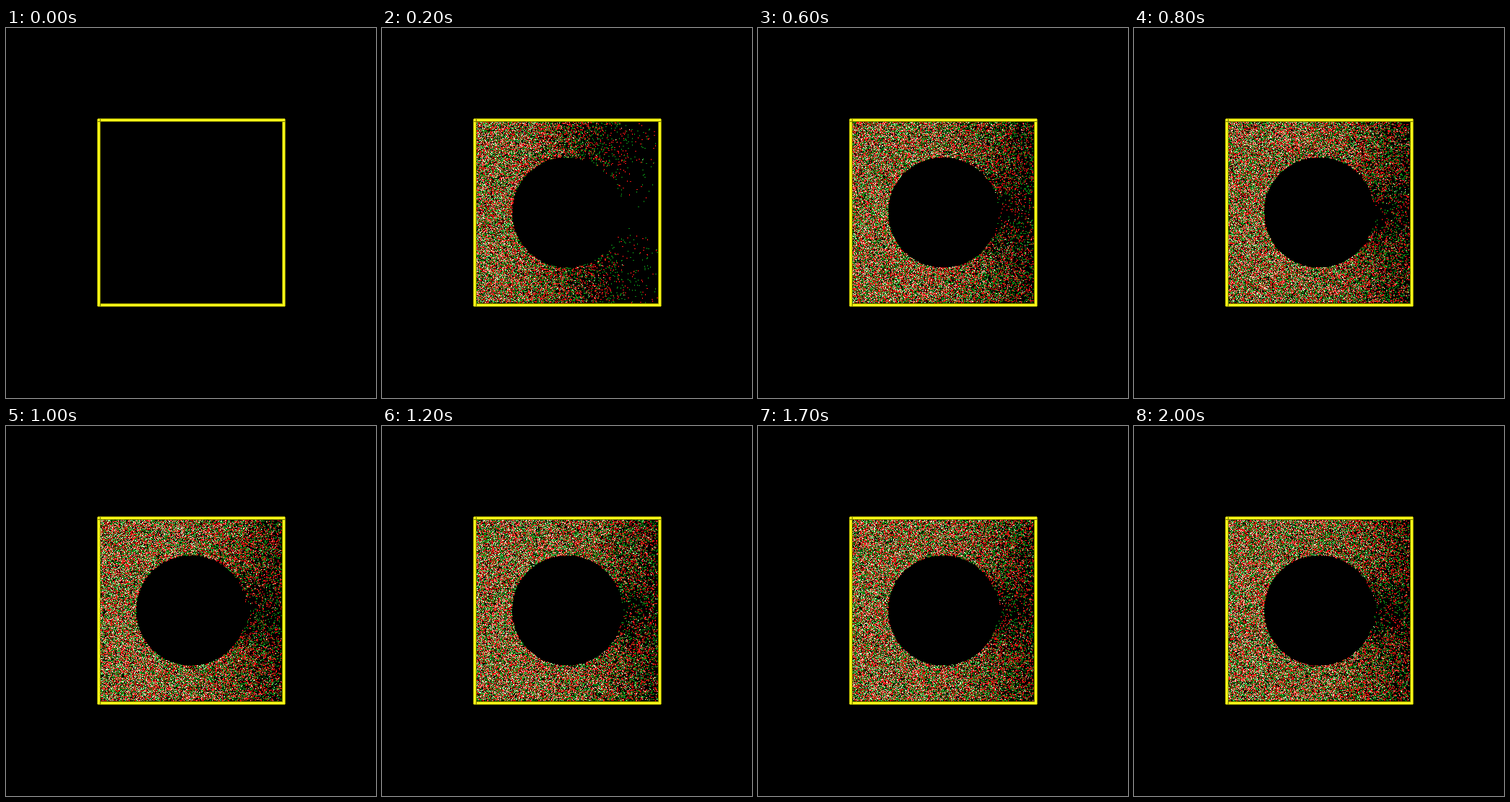
An HTML page with a canvas for the animation above (2.1 s loop, 512 by 512 pixels).

```html
<!DOCTYPE html>
<html lang="en">
<head>
<meta charset="utf-8">
<title>Gas flow around a cylinder</title>
<style>
html, body { margin: 0; width: 100%; height: 100%; overflow: hidden; background: #000; }
canvas { display: block; width: 512px; height: 512px; }
</style>
</head>
<body>
<canvas id="stage" width="512" height="512"></canvas>
<script>
const ctx = document.getElementById('stage').getContext('2d');
const STEP = 100, STEPS = 21;
const LEFT = 131, TOP = 130, SIZE = 251;
const MID = 125, RADIUS = 76.5, CANDIDATES = 54000;

function seeded(seed) {
  return () => {
    seed = (seed + 0x6D2B79F5) | 0;
    let n = Math.imul(seed ^ (seed >>> 15), 1 | seed);
    n ^= n + Math.imul(n ^ (n >>> 7), 61 | n);
    return ((n ^ (n >>> 14)) >>> 0) / 4294967296;
  };
}

function rect(color, x, y, w, h) {
  ctx.fillStyle = color;
  ctx.fillRect(x, y, w, h);
}

// Four bars, each shaded across its width like a thin rod.
function drawFrame() {
  ['#990', '#ee0', '#ff3', '#ee0', '#770'].forEach((color, i) => {
    rect(color, 126 + i, 126, 1, 259);
    rect(color, 382 + i, 126, 1, 259);
    rect(color, 127, 125 + i, 259, 1);
    rect(color, 127, 381 + i, 259, 1);
  });
}

// Density of the gas: a front spreading from the left, thinned by the wake.
function densityAt(step) {
  const front = 207 * (1 - Math.exp(-0.42 * step));
  const spread = 38 * (1 - Math.exp(-0.8 * step));
  const wakeHeight = 40 + 50 * Math.exp(-0.5 * step);
  const wakeLength = 60 + 900 * Math.exp(-0.7 * step);
  return (x, y) => {
    const dx = x - MID, dy = y - MID;
    if (dx * dx + dy * dy < RADIUS * RADIUS) return 0;
    const flow = 1 / (1 + Math.exp((x - front) / spread));
    if (dx < 0) return flow;
    const behind = Math.max(0, dx - RADIUS) / wakeLength;
    return flow * (1 - Math.exp(-((dy / wakeHeight) ** 2) - behind));
  };
}

function drawGas(step) {
  const random = seeded(step * 7919);
  const density = densityAt(step);
  for (let i = 0; i < CANDIDATES; i++) {
    const x = Math.floor(random() * (SIZE - 1));
    const y = Math.floor(random() * (SIZE - 1));
    const d = density(x + 0.5, y + 0.5);
    if (random() >= d) continue;
    const red = random() < 0.5;
    const wide = random() < 0.5 ? 1 : 0;
    rect(red ? '#f01414' : '#0a8a14', LEFT + x, TOP + y, 1 + wide, 2 - wide);
    if (random() < 0.45 * d) {
      rect(red ? '#ffdcc8' : '#d2ffc8', LEFT + x, TOP + y, 1, 1);
    }
  }
}

let shown = -1;
function tick() {
  const step = Math.floor((performance.now() - start) / STEP) % STEPS;
  if (step !== shown) {
    shown = step;
    rect('#000', 0, 0, 512, 512);
    drawFrame();
    if (step) drawGas(step);
  }
  requestAnimationFrame(tick);
}
const start = performance.now();
tick();
</script>
</body>
</html>
```
